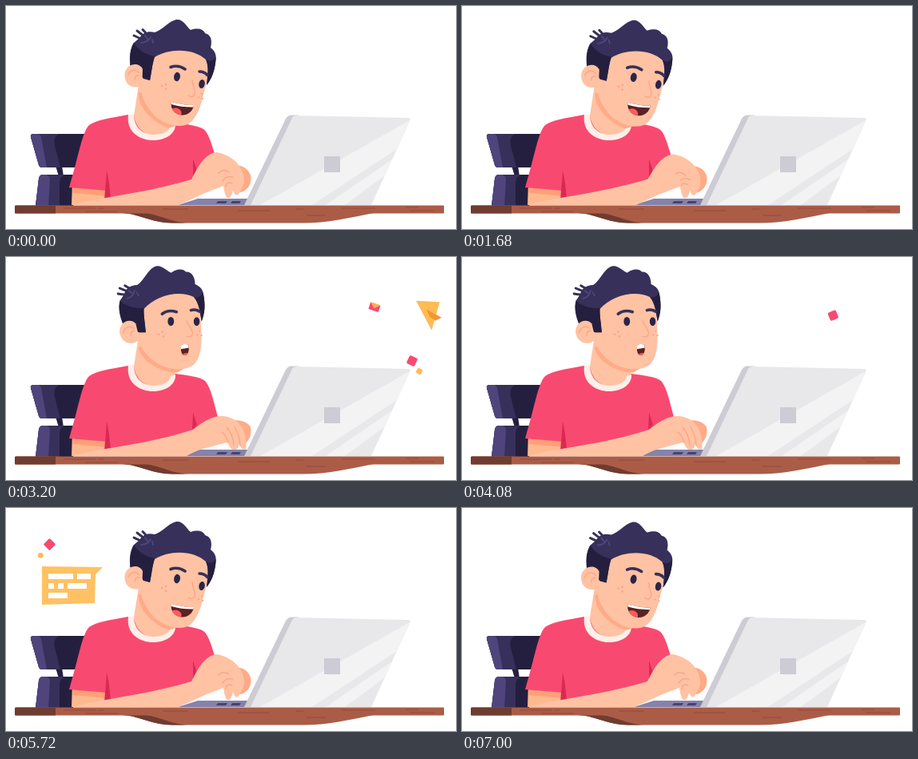
Recreate the animation shown at these times as an HTML page. Size 563 by 279 pixels, loop 7040 ms.

```html
<!DOCTYPE html>
<html lang="en">
<head>
<meta charset="utf-8">
<title>At the laptop</title>
<style>
html, body { margin: 0; width: 100%; height: 100%; overflow: hidden; background: #fff; }
svg { display: block; width: 100%; height: 100%; }
</style>
</head>
<body>
<svg viewBox="0 0 563 279" xmlns="http://www.w3.org/2000/svg">
  <!-- flying things -->
  <path id="ribbon" d="M461 66C400 14 280 10 205 24C178 30 160 44 149 57C142 67 132 76 116 78" fill="none" stroke="#ffbf60" stroke-width="5.5"/>
  <g id="plane"><path d="M-17 -17L12.500 -15.500L2.500 20Z" fill="#ffbb55"/><path d="M-4 -6L15 4L7 8L0 3Z" fill="#f5952f"/></g>
  <g id="mail"><rect x="-6.5" y="-4.5" width="13" height="9" rx="1" fill="#f84a70"/><path d="M-6.5 -4.5H6.5L0 1.5Z" fill="#ffb14d"/></g>
  <rect id="chipA" x="-5.5" y="-5.5" width="11" height="11" rx="2" fill="#f84a70"/>
  <rect id="chipB" x="-3.5" y="-3.5" width="7" height="7" rx="1.5" fill="#ffb95e"/>
  <rect id="chipC" x="-5.5" y="-5.5" width="11" height="11" rx="2" fill="#f84a70"/>
  <path id="burst" fill="none" stroke="#f84a70" stroke-width="5" stroke-linecap="round"/>
  <circle id="dotR" r="4" fill="#ffb95e"/>
  <rect id="diamond" x="-5.5" y="-5.5" width="11" height="11" rx="1.5" fill="#f84a70"/>
  <circle id="dotL" r="3.4" fill="#ffb95e"/>
  <g id="bubble"><path id="balloon" fill="#ffc163"/><g id="lines" fill="#fff"></g></g>

  <!-- chair -->
  <path d="M62 200H70L72 213H66Z" fill="#251f3f"/>
  <path d="M35 160H98V202H45Q42 202 41 199L31 164Q30 160 35 160Z" fill="#251f3f"/>
  <path d="M35 160H66Q58 165 61 175L68 202H45Q42 202 41 199L31 164Q30 160 35 160Z" fill="#37305a"/>
  <path d="M35 160H39Q43 160 44 164L51 202H45Q42 202 41 199L31 164Q30 160 35 160Z" fill="#4f457c"/>
  <path d="M46 211H84V250H37L41 216Q42 211 46 211Z" fill="#251f3f"/>
  <path d="M46 211H74Q67 213 67 222V250H37L41 216Q42 211 46 211Z" fill="#37305a"/>
  <path d="M46 211H50Q55 212 55 217L53 250H37L41 216Q42 211 46 211Z" fill="#4f457c"/>

  <!-- laptop base, body -->
  <path d="M215 249L240 241H303L300 249Z" fill="#8583ab"/>
  <path d="M265 244H277L275 247H263ZM283 244H294L292 247H281Z" fill="#47426f"/>
  <path d="M83 220H128V246L82 249Z" fill="#ffb98f"/>
  <path d="M83 224H128V238L84 234Z" fill="#ff9f78"/>
  <path id="shirt" fill="#f84a70"/>
  <path id="fold" fill="#db2a52"/>
  <path d="M126 206Q130 222 131 243L123 243Z" fill="#db2a52"/>
  <path d="M167 92L160 137C164 168 204 170 211 148L214 120L200 95Z" fill="#ffc2a3"/>
  <path d="M153 136C150 158 168 168 184 168C202 168 213 158 212 147L206 149C205 157 196 161 184 161C168 160 160 150 160 135Z" fill="#fdf0e8"/>

  <g id="head">
    <path d="M166 108C164 124 182 146 204 152.500L216 149L180 110Z" fill="#ffab88"/>
    <path d="M168 92C167 108 172 124 188 139C202 150 220 153 229 147C240 139 244 124 248 107C253 92 256 70 250 48H184Z" fill="#ffc2a3"/>
    <path d="M160 37L171 42M164 31L173 38M171 29.500L177 36" fill="none" stroke="#37305a" stroke-width="3" stroke-linecap="round"/>
    <path d="M157 84C153 66 155 54 160 46L167 40C171 33 178 31 186 33C196 30 203 19 213 17C222 16 225 25 231 30C240 27 247 29 249 34C257 36 258 44 256 52C263 58 263 62 262.500 68C261 80 258 90 251 99C252 88 254 76 250 67C235 53 205 52 186 64C183 72 182 84 180 93L172 91C168 80 160 86 157 84Z" fill="#37305a"/>
    <path d="M157 83C154 68 155 54 160 46C165 55 175 61 186 63C183 72 182 84 180 93L171 90C168 79 160 84 157 83ZM262.500 64C262 80 258 90 251 99C252 88 255 76 250 67C255 70 259 69 262.500 64Z" fill="#251f3f"/>
    <path d="M183 42L184 46M169 46Q177 46 181 39M174 37L177 41" fill="none" stroke="#4f457c" stroke-width="2" stroke-linecap="round"/>
    <path d="M171 79C166 69 151 72 148.500 84C147 97 157 105 170 100Z" fill="#ffc2a3"/>
    <path d="M153 86C156 79 163 79 167 84M161 92C161 88 164 86 167 87" fill="none" stroke="#ffa384" stroke-width="1.300" stroke-linecap="round"/>
    <path d="M206 76.500Q215 73 224 79M242 82Q248 82 252 86.500" fill="none" stroke="#37305a" stroke-width="3.600" stroke-linecap="round"/>
    <g id="eyeL"><ellipse rx="3.900" ry="5.700" fill="#2b2548"/></g>
    <g id="eyeR"><ellipse rx="3.700" ry="5.500" fill="#2b2548"/></g>
    <path d="M233 93C233 100 239 107 235 112Q232 115 228 112" fill="none" stroke="#ffa384" stroke-width="1.300" stroke-linecap="round"/>
    <g fill="#ff9f80"><circle cx="195" cy="100" r="1.200"/><circle cx="200" cy="98" r="1.200"/><circle cx="200" cy="104" r="1.200"/><circle cx="241" cy="114" r="1.100"/><circle cx="246" cy="116" r="1.100"/><circle cx="245" cy="110" r="1"/></g>
    <clipPath id="lips"><path id="lipShape"/></clipPath>
    <path id="mouth" fill="#5a2224"/>
    <g clip-path="url(#lips)">
      <path id="teeth" d="M205 117L237 121V126.500Q220 127 207 123Z" fill="#fff"/>
      <ellipse id="tongue" cx="212" cy="134" rx="7.500" ry="6.500" fill="#ff5b5e"/>
    </g>
  </g>

  <!-- hands -->
  <path id="farHand" fill="#ffab88"/>
  <path id="arm" fill="#ffc2a3"/>
  <path id="creases" fill="none" stroke="#f9a283" stroke-width="1.200" stroke-linecap="round"/>

  <!-- laptop lid -->
  <path d="M357 136.500H366L310 249H298L350 141Q353 136.500 357 136.500Z" fill="#cdcbd3"/>
  <path d="M362 137L503 140Q507 140 505 144L457 249H306L358 140Q360 137 362 137Z" fill="#e8e7ea"/>
  <path d="M505 143L489 179L383 249H318Z" fill="#f3f3f4"/>
  <path d="M483 192L474 212L424 249H400Z" fill="#f3f3f4"/>
  <rect x="398" y="188" width="20" height="20" fill="#cdccd4"/>

  <!-- table -->
  <path d="M146 259C170 261 180 271 208 271.500H372C402 271.500 430 265 460 259Z" fill="#ab5c47"/>
  <path d="M146 259C170 261 180 271 208 271.500H228C204 270 196 262 174 259Z" fill="#6f3c30"/>
  <rect x="11" y="249.500" width="537" height="10" rx="1" fill="#ab5c47"/>
  <path d="M12 249.500H62V259.500H12Q11 259.500 11 258V251Z" fill="#6f3c30"/>
  <path d="M72 253H112M116 253H122M100 257H140M196 254H228M290 256H330M362 254H372M376 262H400M420 253H462M500 252H516M505 256H536" fill="none" stroke="#934a39" stroke-width="1"/>
</svg>
<script>
const LOOP = 7040, TYPE = 1920 / 7, BOB = 720;
const el = id => document.getElementById(id);
const clamp = x => Math.min(1, Math.max(0, x));
const span = (t, a, b) => clamp((t - a) / (b - a));
const out = x => 1 - (1 - x) ** 3;
const inOut = x => x * x * (3 - 2 * x);
const lerp = (a, b, k) => a + (b - a) * k;
const set = (id, name, v) => el(id).setAttribute(name, v);

// Blend two paths that have the same commands.
function mix(a, b, k) {
  const nums = b.match(/-?[\d.]+/g);
  let i = 0;
  return a.replace(/-?[\d.]+/g, n => lerp(+n, +nums[i++], k).toFixed(2));
}

function place(id, x, y, scale = 1, turn = 0) {
  set(id, 'transform', `translate(${x} ${y}) rotate(${turn}) scale(${scale})`);
  set(id, 'visibility', scale > 0.01 ? 'visible' : 'hidden');
}

// Pairs: hands on the keys, hands lifted.
const SHIRT = [
  'M153 136C130 140 112 143 104 149C95 158 91 188 79 227L126 231L122 246L246 224L265 200C260 182 256 162 249 155C243 150 228 148 211 146Z',
  'M153 136C130 140 112 143 104 149C95 158 91 188 79 227L126 231L122 246L244 224L261 185C257 172 253 158 247 154C240 150 228 148 211 146Z'];
const FOLD = ['M234 194L239 210L233 216Z', 'M234 191L239 206L234 215Z'];
const ARM = [
  'M82 249L112 242C150 236 195 229 234 216C243 209 255 199 271 199C283 200 291 206 296 214C299 222 302 234 300 240C297 242 294 240 292 234C291 238 289 242 285 241C281 241 279 236 277 232C265 235 254 238 243 241C237 243 231 246 226 249Z',
  'M82 249L112 242C150 236 195 228 232 217C238 206 247 184 264 183C278 186 288 193 293 202C298 209 300 220 295 228C291 238 287 240 284 230C283 236 281 241 277 240C274 238 273 231 272 225C262 229 250 233 240 238C232 242 222 246 216 249Z'];
const FAR = [
  'M278 206C288 202 302 205 306 213C308 222 304 231 296 236L284 230Z',
  'M280 204C288 196 302 200 306 212C308 220 304 230 294 233L284 230Z'];
const CREASES = [
  'M276 213Q284 222 285 236M286 213Q292 222 293 236M270 219Q276 224 278 232',
  'M266 209Q272 203 279 208M271 219Q275 212 284 214M275 226Q276 219 283 222'];
const MOUTH = [
  'M207 120C215 122 226 124.5 235 124C234 131 228 137 220 136.5C211 136 205 128 207 120Z',
  'M218.3 120.4C221 119.5 225 120.7 227 122.9C226.5 130 223 135.3 219.1 134.1C215 133 215.5 127 218.3 120.4Z'];
const BALLOON = [
  'M103 73L118 73L118 74L118 84L103 84.500Z',
  'M45 73L121 74L112 83L111 119L45 121Z'];

const BARS = [[53, 82, 31], [89, 82, 17], [53, 94, 7], [65, 94, 7], [77, 94, 24], [53, 106, 24]];
el('lines').innerHTML = BARS.map(([x, y]) => `<rect x="${x}" y="${y}" height="7"/>`).join('');
const barEls = [...el('lines').children];
const ribbonLen = el('ribbon').getTotalLength();

function lift(t) {
  const wave = p => (1 + Math.cos(2 * Math.PI * p / TYPE)) / 2;
  if (t < 8.5 * TYPE) return wave(t);
  if (t < 4760) return 0;
  return wave(Math.min(t, 5720 + 3 * TYPE) - 5720);
}

function bob(t) {
  if (t > 2160 && t < 5040) return 0;
  return (1 - Math.cos(2 * Math.PI * t / BOB)) / 2;
}

function drawPerson(t) {
  const k = lift(t);
  for (const [id, pair] of [['shirt', SHIRT], ['fold', FOLD], ['arm', ARM], ['farHand', FAR], ['creases', CREASES]])
    set(id, 'd', mix(...pair, k));

  const up = out(span(t, 2940, 3160)) - inOut(span(t, 4500, 4700));
  const b = bob(t);
  set('head', 'transform', `translate(${b} ${b}) rotate(${-16 * up} 182 112)`);
  const lips = mix(...MOUTH, up);
  set('mouth', 'd', lips);
  set('lipShape', 'd', lips);
  set('tongue', 'transform', `translate(${8 * up} ${4 * up})`);
  const blink = Math.sin(Math.PI * span(t, 3780, 3960));
  for (const [id, x, y] of [['eyeL', 214, 88.5], ['eyeR', 245, 97.5]])
    set(id, 'transform', `translate(${x} ${y}) rotate(${lerp(10, 16, up)}) scale(1 ${1 - 0.9 * blink})`);
}

// Thrown from behind the lid, passing (x, y) at 3200 ms.
function toss(id, t, x0, y0, x, y, spin) {
  const g = out(span(t, 2940, 3640)) / out(26 / 70);
  const size = span(t, 2940, 3080) * (1 - span(t, 3380, 3640) ** 2);
  place(id, lerp(x0, x, g), lerp(y0, y, g), size, spin * g);
}

function drawRight(t) {
  toss('plane', t, 495, 155, 530, 72, 0);
  toss('mail', t, 486, 155, 461, 63, 18);
  toss('chipA', t, 493, 168, 508, 130, 25);
  toss('chipB', t, 496, 172, 517, 143, 30);

  const rise = out(span(t, 3780, 4320));
  const swell = 1 + 0.3 * span(t, 4380, 4520);
  place('chipC', lerp(494, 461.5, rise), lerp(148, 66, rise),
    t > 3780 && t < 4580 ? swell * (1 - span(t, 4500, 4580)) : 0, 270 * rise);

  const far = lerp(4, 16, out(span(t, 4540, 4800)));
  const near = Math.min(far, lerp(2, 15.8, span(t, 4580, 4860)));
  const rays = [[1, 0], [-1, 0], [0, 1], [0, -1]].map(([x, y]) =>
    `M${461.5 + x * near} ${66 + y * near}L${461.5 + x * far} ${66 + y * far}`);
  set('burst', 'd', rays.join(''));
  set('burst', 'visibility', t > 4540 && t < 4900 ? 'visible' : 'hidden');
  set('burst', 'stroke-width', 5 * (1 - span(t, 4760, 4900)));

  const fall = out(span(t, 4540, 4960)) / out(18 / 42);
  place('dotR', lerp(461, 394, fall), lerp(66, 92, fall),
    t > 4540 ? span(t, 4540, 4620) * (1 - span(t, 4780, 4960)) : 0);
}

function drawLeft(t) {
  const tip = ribbonLen * inOut(span(t, 4440, 4710));
  const tail = lerp(0, ribbonLen - 42, inOut(span(t, 4500, 4720))) + 42 * span(t, 4720, 4880);
  set('ribbon', 'stroke-dasharray', `0 ${tail} ${Math.max(0, tip - tail)} ${ribbonLen * 2}`);
  set('ribbon', 'visibility', t > 4440 && t < 4880 ? 'visible' : 'hidden');

  const grow = out(span(t, 4720, 5160));
  const leave = span(t, 6040, 6480);
  const size = t < 4690 ? 0 : 1 + 0.3 * leave - 1.3 * leave ** 3;
  set('balloon', 'd', mix(...BALLOON, grow));
  set('bubble', 'transform', `translate(80 97) scale(${size}) translate(-80 -97)`);
  set('bubble', 'visibility', size > 0.01 ? 'visible' : 'hidden');
  barEls.forEach((bar, i) =>
    bar.setAttribute('width', BARS[i][2] * out(span(t, 5160 + i * 60, 5360 + i * 60))));

  const pop = out(span(t, 4920, 5190));
  const drift = inOut(span(t, 6040, 6600));
  place('diamond', lerp(72, 54.5, pop) - 36 * drift, lerp(85, 45.5, pop) - 4 * drift,
    pop * (1 - span(t, 6300, 6600)), 45 + 90 * drift);
  place('dotL', lerp(66, 43.3, pop), lerp(88, 59.3, pop), pop * (1 - span(t, 6660, 6940)));
}

function draw(t) {
  drawPerson(t);
  drawRight(t);
  drawLeft(t);
}

const start = performance.now();
function tick() {
  draw((performance.now() - start) % LOOP);
  requestAnimationFrame(tick);
}
draw(0);
requestAnimationFrame(tick);
</script>
</body>
</html>
```
